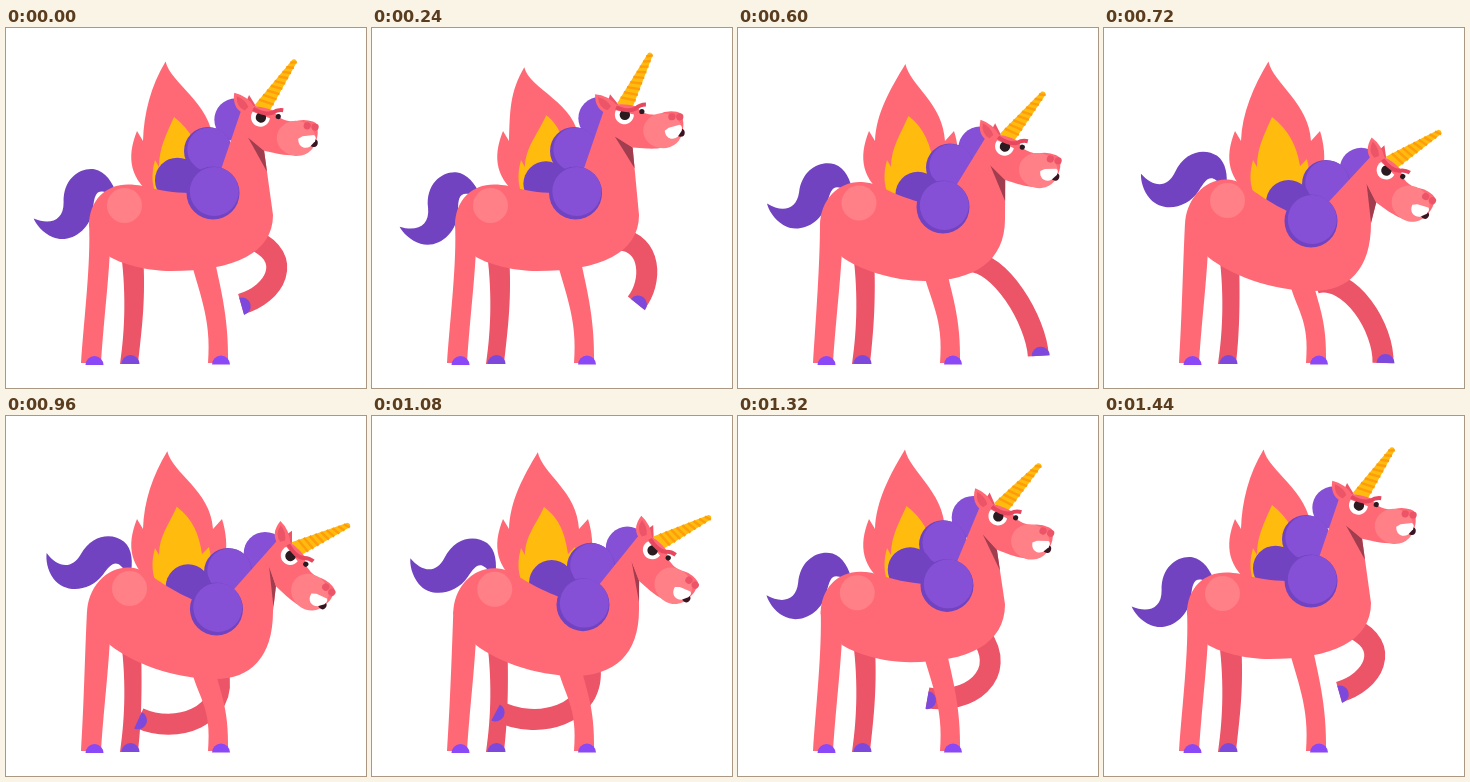
Recreate the animation shown at these times as an HTML page with a canvas. Size 360 by 360 pixels, loop 1500 ms.

```html
<!DOCTYPE html>
<html lang="en">
<head>
<meta charset="utf-8">
<title>Angry unicorn</title>
<style>
  html, body { margin: 0; height: 100%; overflow: hidden; background: #fff; }
  canvas { display: block; }
</style>
</head>
<body>
<canvas width="360" height="360"></canvas>
<script>
const ctx = document.querySelector('canvas').getContext('2d');
const PINK = '#ff6976', DARK_PINK = '#ec5468', LIGHT_PINK = '#ff8087';
const PURPLE = '#8650d6', DARK_PURPLE = '#7143c0', HOOF = '#8b48f6', FAR_HOOF = '#7d48dc';
const GOLD = '#ffbb0e', ORANGE = '#ff9c0c';
const LOOP = 1500, STRIDE = 1440, STEP = 60, RAD = Math.PI / 180;

// Stations of the raised hoof, evenly spaced over the stride.
const hoofPath = [[235, 276], [264, 275], [299, 312], [279, 335], [133, 302], [146, 289]];

// Closed Catmull-Rom spline.
function along(points, phase) {
  const i = Math.floor(phase), f = phase - i, n = points.length;
  const [a, b, c, d] = [-1, 0, 1, 2].map(k => points[(i + k + n) % n]);
  return b.map((v, j) => v + f / 2 * (c[j] - a[j] + f * (2 * a[j] - 5 * v + 4 * c[j] - d[j]
    + f * (3 * (v - c[j]) + d[j] - a[j]))));
}

function ease(time, from, to) {
  const u = Math.min(1, Math.max(0, (time - from) / (to - from)));
  return u * u * (3 - 2 * u);
}

function fill(color, path) {
  ctx.fillStyle = color;
  ctx.fill(new Path2D(path));
}

function disc(color, x, y, r, ry = r) {
  ctx.fillStyle = color;
  ctx.beginPath();
  ctx.ellipse(x, y, r, ry, 0, 0, 7);
  ctx.fill();
}

function line(color, width, path) {
  ctx.strokeStyle = color;
  ctx.lineWidth = width;
  ctx.stroke(new Path2D(path));
}

function placed(x, y, angle, draw) {
  ctx.save();
  ctx.translate(x, y);
  ctx.rotate(angle);
  draw();
  ctx.restore();
}

const hoof = (color, x, y, angle = 0) =>
  placed(x, y, angle, () => fill(color, 'M-9 0A9 9 0 0 1 9 0Z'));

function shadedLock(x, y, r) {
  disc(DARK_PURPLE, x, y, r);
  disc(PURPLE, x + 1.3, y - 1.6, r - 2);
}

function drawTail(turn) {
  placed(105 + turn * .6, 158 - turn * .35, turn * RAD, () => fill(DARK_PURPLE,
    'M-77 26C-61 34 -47 30 -46 12C-45 -12 -27 -22 -13 -19C-2 -16 4 -5 8 8L-5 4' +
    'C-13 2 -15 8 -17 20C-21 42 -43 54 -59 46C-69 41 -75 32 -77 26Z'));
}

function drawWing(a) {
  const x = 162 - 4.5 * Math.cos(a - 1) - 6 * Math.sin(2 * a);
  const y = 36 + 2.3 * Math.sin(a) - 2.5 * Math.cos(2 * a);
  fill(PINK, `M${x} ${y}C${x + 5} ${y + 22} 205 75 207 113L216 103C224 128 222 160 200 185
    L150 170C124 152 120 130 131 103L137 113C138 85 ${x - 15} ${y + 25} ${x} ${y}Z`);
  const fx = 171 - 3 * Math.cos(2 * a) + 2 * Math.sin(a), fy = 89 - 2 * Math.sin(a);
  fill(GOLD, `M${fx} ${fy}C${fx + 16} ${fy + 12} 193 118 196 138L203 131C208 150 204 170 195 185
    L165 182L150 167C145 154 146 143 149 132L153 139C153 120 ${fx - 8} ${fy + 18} ${fx} ${fy}Z`);
}

// A limb bowed sideways off the line from shoulder to hoof.
function drawForeleg(sx, sy, [x, y], bend) {
  const dx = x - sx, dy = y - sy, k = bend / Math.hypot(dx, dy);
  const control = (part, push) => [sx + part * dx + push * k * dy, sy + part * dy - push * k * dx];
  const c1 = control(.15, 1.5), c2 = control(.75, 1.1);
  line(DARK_PINK, 21, `M${sx} ${sy}C${c1} ${c2} ${x} ${y}`);
  const angle = Math.atan2(y - c2[1], x - c2[0]);
  hoof(FAR_HOOF, x + 2.5 * Math.sin(angle), y - 2.5 * Math.cos(angle), angle - Math.PI / 2);
}

function drawHorn() {
  fill(GOLD, 'M-4 -8L55 -2.5Q58 0 55 2.5L-4 8Z');
  for (let x = 5; x < 56; x += 6) {
    const w = 8 - x * .1;
    line(ORANGE, 2.4, `M${x - 2} ${-w}L${x + 2} ${w}`);
  }
}

function drawHead() {
  fill(DARK_PINK, 'M-15 -21L-5 -9L-18 -10Z');
  placed(1, -12, -64 * RAD, drawHorn);
  disc('#fff', 16, -4, 4.2);
  fill(PINK, 'M-19 -9Q-4 -13 12 -9Q17 0 33 -1Q42 -6 52 -4Q58 -3 58 4C60 12 57 21 50 26C42 34 28 33 22 33L8 32L-10 21Z');
  disc(LIGHT_PINK, 38, 15, 19.5, 17.5);
  disc(DARK_PINK, 47, 1, 3.6);
  disc(DARK_PINK, 55, 1, 3.6);
  fill('#fff', 'M-9 -5L9 -1A9.5 9.5 0 1 1 -9 -5Z');
  disc('#2b1a20', 0, -.5, 5.2);
  disc('#2b1a20', 17, -4, 2.6);
  line('#e8485e', 4, 'M-9 -8Q4 -3 11 -7Q15 -11 21 -11');
  disc('#3a1420', 56, 17, 4);
  fill('#fff', 'M40 15C41 23 48 25 53 21L57 15Q58 10 55 9L44 12Z');
  fill(PINK, 'M-30 -21Q-30 -4 -15 -1L-8 -10Q-17 -20 -30 -21Z');
  fill(DARK_PINK, 'M-27 -18Q-26 -7 -17 -5L-14 -9Q-18 -16 -27 -18Z');
}

function draw(time) {
  const turn = Math.min(time, STRIDE) / STRIDE % 1, a = turn * 2 * Math.PI;
  const bow = ease(time, 480, 720) * (1 - ease(time, 960, STRIDE));
  const sway = Math.cos(a + 65 * RAD);

  const ex = 254 + 29 * bow + 2 * sway, ey = 90 + 53 * bow - 3 * Math.sin(2 * a);
  const tilt = 5 + 30 * bow + 8 * sway;
  const mx = 202 + 20 * bow, my = 123 + 33 * bow;
  const cx = 207 - 4 * Math.sin(a), cy = 165 + 28 * bow;
  const kx = 267, ky = 187 + 8 * bow;
  const belly = 243 + 20 * bow, bx = 165 + 44 * bow;
  const rump = 156.5 - 5 * bow, left = 83 - 2 * bow;

  const cos = Math.cos(tilt * RAD), sin = Math.sin(tilt * RAD);
  const onHead = (x, y) => [ex + x * cos - y * sin, ey + x * sin + y * cos];
  const nape = onHead(-20, -8), throat = onHead(-10, 21), jaw = onHead(8, 32);

  ctx.fillStyle = '#fff';
  ctx.fillRect(0, 0, 360, 360);

  drawTail(-6 + 30 * bow + 5 * sway);
  drawWing(a);
  disc(PURPLE, ex - 25, ey + 3 - tilt * .15, 21.5);
  shadedLock(mx, my, 24);
  disc(DARK_PURPLE, mx - 28 - tilt * .3, my + 33 - tilt * .46, 22.5);

  fill(DARK_PINK, `M115 225C121 270 118 310 114 336L132 336
    C136 300 ${140 - 4 * bow} 270 ${137 - 2 * bow} 225Z`);
  hoof(FAR_HOOF, 124.5, 336);
  drawForeleg(248 - 36 * bow, 212 + 43 * bow, along(hoofPath, turn * 6), 25 + 9 * sway);

  fill(PINK, `M${left} 195C${left + 2 - 4 * bow} 235 78 290 75 335L95 335C98 290 102 260 104 222Z`);
  fill(PINK, `M184 ${belly - 14}C192 ${belly + 20} 206 290 202 335L222 335
    C223 290 214 ${belly + 15} 208 ${belly - 14}Z`);
  hoof(HOOF, 88.5, 337);
  hoof(HOOF, 215, 336.5);

  fill(PINK, `M${left} 198C${left} 172 100 ${rump} 122 ${rump}
    C145 ${rump} 150 ${167 + 5 * bow} ${cx} ${cy}L${nape}L${onHead(10, 0)}L${jaw}L${kx} ${ky}
    C${kx} ${ky + .68 * (belly - ky)} ${bx + .62 * (kx - bx)} ${belly} ${bx} ${belly}
    C${bx - .4 * (bx - 104)} ${belly} ${.2 * bx + 83.2} ${(belly + 229) / 2} 104 229Z`);
  disc(LIGHT_PINK, 275 - rump, rump + 21, 17.5);

  const reach = 21 / Math.hypot(kx - jaw[0], ky - jaw[1]);
  const fold = [jaw[0] + (kx - jaw[0]) * reach, jaw[1] + (ky - jaw[1]) * reach];
  fill('#a03e50', `M${throat}L${jaw}L${fold}Z`);

  shadedLock(cx, cy, 26.5);
  placed(ex, ey, tilt * RAD, drawHead);
}

function tick() {
  draw(Math.floor(performance.now() % LOOP / STEP) * STEP);
  requestAnimationFrame(tick);
}
tick();
</script>
</body>
</html>
```
